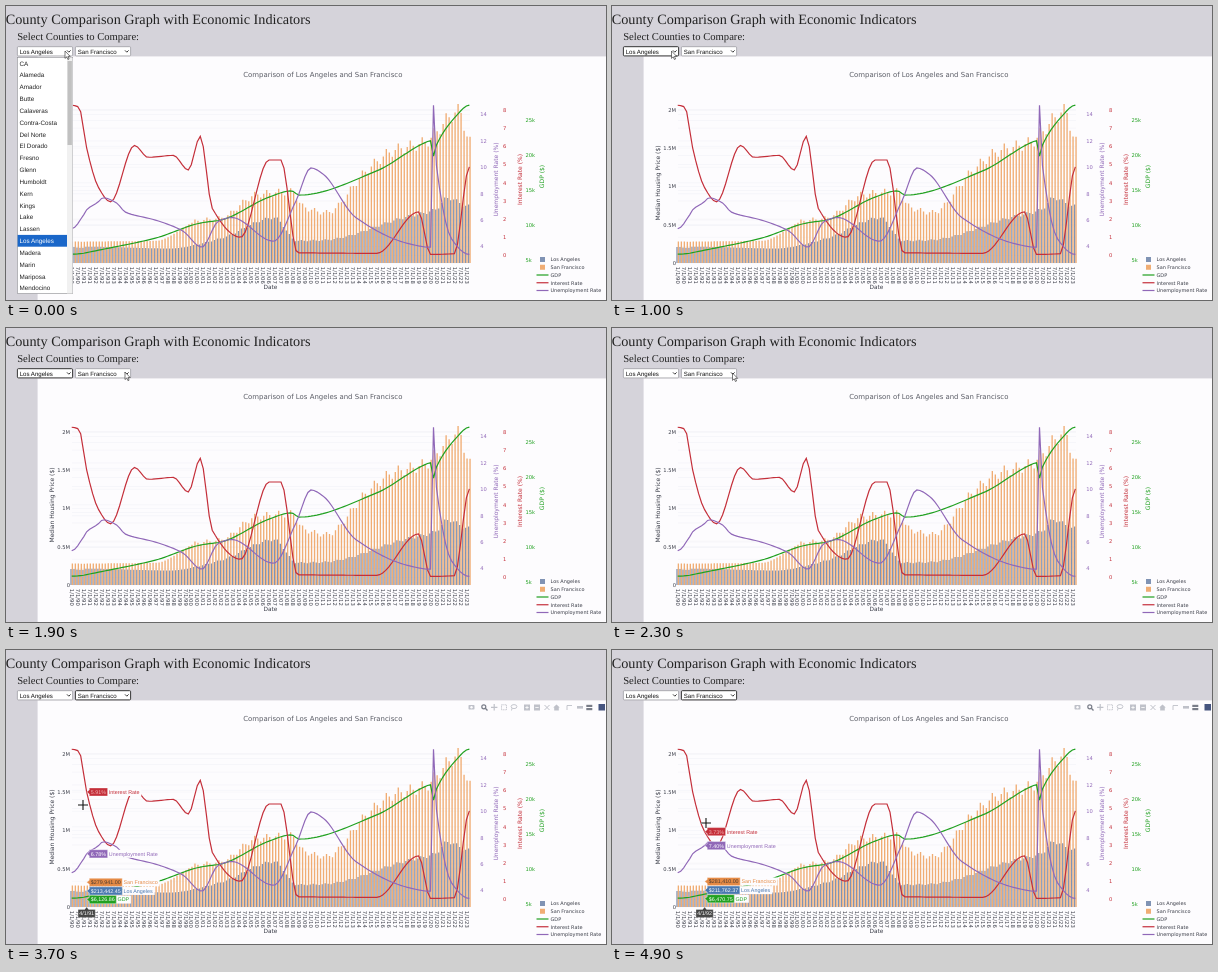
An HTML page for the animation above (5000 ms loop, 600 by 294 pixels).

```html
<!DOCTYPE html>
<html lang="en">
<head>
<meta charset="utf-8">
<title>County Comparison Graph</title>
<style>
html, body { margin: 0; width: 100%; height: 100%; overflow: hidden; background: #d5d3da; }
svg { display: block; width: 600px; height: 294px; text-rendering: geometricPrecision; }
.serif { font-family: "Liberation Serif", serif; }
.sans { font-family: "Liberation Sans", sans-serif; }
.plot { font-family: "DejaVu Sans", sans-serif; }
</style>
</head>
<body>
<svg id="stage" viewBox="0 0 600 294"><g id="page"></g><g id="live"></g></svg>
<script>
const RED = '#c42f3a', PURPLE = '#9068b8', GREEN = '#21a121', BLUE = '#8093b4', ORANGE = '#f0ad74', INK = '#3a3d48';
const BASE = 257, STEP = 2.99, QUARTERS = Array.from({ length: 134 }, (_, q) => q);
const quarterX = q => 65.7 + q * STEP;

// Smooth curve through key points that never overshoots them
function curve(...keys) {
  const slope = i => keys[i] && keys[i + 1] ? (keys[i + 1][1] - keys[i][1]) / (keys[i + 1][0] - keys[i][0]) : 0;
  const tangent = i => {
    const a = slope(i - 1), b = slope(i);
    return a * b > 0 ? 2 * a * b / (a + b) : 0;
  };
  return x => {
    const i = keys.findLastIndex(k => k[0] <= x);
    if (i < 0) return keys[0][1];
    if (i === keys.length - 1) return keys[i][1];
    const [[x0, y0], [x1, y1]] = keys.slice(i), w = x1 - x0, u = (x - x0) / w, v = 1 - u;
    return v * v * (1 + 2 * u) * y0 + u * u * (1 + 2 * v) * y1 + u * v * w * (v * tangent(i) - u * tangent(i + 1));
  };
}

const seasonal = (trend, size) => q => trend(q) * (1 + (q > 40 ? size * Math.cos((q - 1) * Math.PI / 2) : 0));
const percent = v => v.toFixed(2) + '%';
const money = v => '$' + v.toLocaleString('en-US', { minimumFractionDigits: 2, maximumFractionDigits: 2 });
const priceY = v => BASE - v * 76.6;

// Values by quarter since 1990: percent, thousands or millions of dollars
const interest = {
  name: 'Interest Rate', color: RED, y: v => 249.5 - 18.19 * v, show: percent,
  value: curve([0, 8.26], [2.5, 8.15], [4, 6.91], [5, 5.91], [9, 3.73], [13, 2.95], [21, 6.05], [25.5, 5.4], [34, 5.5],
    [39, 4.7], [43, 6.55], [47, 2.6], [56.5, 1], [66, 5.25], [70, 5.25], [75.5, .15], [102, .12], [116, 2.4],
    [120, .06], [128, .1], [133, 4.87])
};
const jobless = {
  name: 'Unemployment Rate', color: PURPLE, y: v => 240.5 - 13.2 * (v - 4), show: percent,
  value: curve([0, 5.35], [4, 6.4], [5, 6.78], [9, 7.4], [10.5, 7.7], [15, 7.3], [18, 6.6], [28, 6], [37, 5.2], [43.5, 3.95],
    [49, 5.9], [53.5, 6.2], [67.5, 4.4], [75, 7.45], [80, 9.95], [84, 9.5], [95, 6.2], [113, 4.2], [120, 3.95],
    [121, 14.7], [122, 10.1], [127, 4.6], [133, 3.4])
};
const gdp = {
  name: 'GDP', color: GREEN, y: v => 254.5 - 7 * (v - 5), show: v => money(v * 1e3),
  value: curve([0, 5.9], [4, 6.03518], [5, 6.12686], [9, 6.47075], [28, 8.2], [43, 10.35], [50, 10.8], [66, 14.05],
    [73.5, 14.95], [76, 14.35], [102, 17.8], [118, 21.8], [120, 22.1], [121, 19.9], [122, 21.5], [128.5, 25.6], [133, 27.2])
};
const priceA = {
  name: 'Los Angeles', color: '#4a78b0', y: priceY, show: v => money(v * 1e6),
  value: seasonal(curve([0, .21], [4, .19770641], [5, .21344245], [9, .21176237], [33, .19], [50, .32], [68, .59],
    [75.5, .29], [85, .3], [111, .59], [122, .7], [126, .85], [133, .74]), .03)
};
const priceB = {
  name: 'San Francisco', color: '#e58a45', y: priceY, show: v => money(v * 1e6),
  value: seasonal(curve([0, .28], [4, .278161], [5, .279941], [9, .28141], [28, .29], [42, .55], [50, .59], [61.5, .89],
    [73.5, .93], [77, .74], [85, .66], [98, 1.19], [107, 1.46], [118, 1.58], [129.5, 1.98], [133, 1.57]), .05)
};

const rect = (x, y, w, h, fill, extra = '') => `<rect x="${x}" y="${y}" width="${w}" height="${h}" fill="${fill}" ${extra}/>`;
const path = (d, stroke, w = 1, fill = 'none') => `<path d="${d}" stroke="${stroke}" stroke-width="${w}" fill="${fill}"/>`;
const text = (s, x, y, size, fill, cls = 'plot', extra = '') =>
  `<text x="${x}" y="${y}" font-size="${size}" fill="${fill}" class="${cls}" ${extra}>${s}</text>`;
const middle = 'text-anchor="middle"';
const vertical = (s, x, y, fill) => text(s, 0, 2, 6, fill, 'plot', `${middle} transform="translate(${x} ${y}) rotate(-90)"`);
const dateOf = q => `${q % 4 * 3 + 1}/1/${String((90 + (q >> 2)) % 100).padStart(2, '0')}`;

const bars = ({ value, y }, color, shift) =>
  path(QUARTERS.map(q => `M${quarterX(q) + shift} ${BASE}V${y(value(q))}`).join(''), color, 1.35);
const line = ({ value, y, color }) =>
  path('M' + QUARTERS.map(q => `${quarterX(q)} ${y(value(q))}`).join('L'), color, 1.2);

function axis(n, y0, step, x, fill, label, anchor = 'start') {
  let s = '';
  for (let i = 0; i < n; i++) {
    const y = y0 - i * step;
    s += path(`M66 ${y}H464`, '#efeef5', .5) + text(label(i), x, y + 1.8, 5.2, fill, 'plot', `text-anchor="${anchor}"`);
  }
  return s;
}

function legend() {
  const rows = [['Los Angeles', BLUE], ['San Francisco', ORANGE], ['GDP', GREEN], ['Interest Rate', RED], ['Unemployment Rate', PURPLE]];
  return rows.map(([name, c], i) => {
    const y = 253.5 + i * 7.75;
    return (i < 2 ? rect(534, y - 2.5, 5, 5, c) : path(`M530.5 ${y}H542.5`, c, 1.2)) + text(name, 544.5, y + 1.8, 4.95, INK);
  }).join('');
}

function chart() {
  const dates = QUARTERS.filter(q => q % 2 === 0).map(q =>
    text(dateOf(q), 0, 1.8, 5.3, INK, 'plot', `transform="translate(${quarterX(q)} 260.8) rotate(90)"`)).join('');
  return rect(31.6, 50.4, 569, 244, '#fdfcfe')
    + text('Comparison of Los Angeles and San Francisco', 316.8, 71, 6.95, '#5b5d66', 'plot', middle)
    + axis(5, BASE, 38.3, 64, INK, i => i ? i / 2 + 'M' : '0', 'end')
    + axis(6, 240.5, 26.4, 474.3, PURPLE, i => 4 + 2 * i)
    + axis(9, 249.5, 18.19, 497, RED, i => i)
    + axis(5, 254.5, 35, 519.5, GREEN, i => 5 + 5 * i + 'k')
    + vertical('Median Housing Price ($)', 46.4, 177, INK) + vertical('Unemployment Rate (%)', 490, 173.5, PURPLE)
    + vertical('Interest Rate (%)', 513.5, 173.5, RED) + vertical('GDP ($)', 536, 170.5, GREEN)
    + dates + text('Date', 264.5, 283, 5.8, INK, 'plot', middle)
    + bars(priceA, BLUE, -.67) + bars(priceB, ORANGE, .67)
    + line(gdp) + line(interest) + line(jobless) + legend();
}

function select(x, label, focused) {
  return rect(x + .4, 40.7, 55.2, 9.2, '#fff', `rx="1" stroke="${focused ? '#222' : '#85858c'}" stroke-width="${focused ? .9 : .6}"`)
    + text(label, x + 2.7, 47.6, 6.1, '#111', 'sans') + path(`M${x + 50} 44.4l1.8 1.8l1.8 -1.8`, '#222', .9);
}

const firstList = ['CA', 'Alameda', 'Amador', 'Butte', 'Calaveras', 'Contra-Costa', 'Del Norte', 'El Dorado', 'Fresno', 'Glenn',
  'Humboldt', 'Kern', 'Kings', 'Lake', 'Lassen', 'Los Angeles', 'Madera', 'Marin', 'Mariposa', 'Mendocino'];
const secondList = [...firstList.slice(14), 'Merced', 'Mono', 'Monterey', 'Napa', 'Nevada', 'Orange', 'Placer', 'Plumas',
  'Riverside', 'Sacramento', 'San Benito', 'San Bernardino', 'San Diego', 'San Francisco'];

function popup(x, items, chosen, thumbY) {
  let s = rect(x + .3, 51.3, 55.4, 236.4, '#fff', 'stroke="#8a8a90" stroke-width=".6"');
  items.forEach((name, i) => {
    const y = 57.2 + i * 11.84, on = name === chosen;
    if (on) s += rect(x + .6, y - 5.9, 49.4, 11.8, '#1a67c9');
    s += text(name, x + 2.5, y + 2.3, 6.3, on ? '#fff' : '#222', 'sans');
  });
  return s + rect(x + 50, 51.6, 5.4, 235.8, '#f1f1f1') + rect(x + 50.5, thumbY, 4.4, 84, '#c1c1c1');
}

function modebar() {
  const c = '#bfc1c9', dark = '#797d88';
  return rect(462.5, 55, 6, 4.6, c, 'rx=".8"') + '<circle cx="465.5" cy="57.3" r="1.2" fill="#fdfcfe"/>'
    + `<circle cx="477.8" cy="56.8" r="2" fill="none" stroke="${dark}" stroke-width="1.2"/>` + path('M479.3 58.3l2.2 2.2', dark, 1.3)
    + path('M485 57.3h6.4M488.2 54.1v6.4', c, 1.2)
    + rect(495.5, 54.8, 5, 5, 'none', `stroke="${c}" stroke-width=".9" stroke-dasharray="1.2 .6"`)
    + `<ellipse cx="508" cy="56.6" rx="2.9" ry="2" fill="none" stroke="${c}" stroke-width=".9"/>` + path('M506 58.3l-.5 2.2', c, .9)
    + rect(518, 54.5, 6, 6, c) + path('M519.3 57.5h3.4M521 55.8v3.4', '#fff', .8)
    + rect(528, 54.5, 6, 6, c) + path('M529.3 57.5h3.4', '#fff', .8)
    + path('M538.5 55l5 5M543.5 55l-5 5', c, 1)
    + path('M547.2 57.5l3.3 -3l3.3 3h-1v3h-4.6v-3z', 'none', 0, c)
    + path('M561 60v-4.5h5', c, .9) + rect(571, 56, 6, 2.6, c)
    + rect(580.3, 54.8, 6, 2.2, dark) + rect(580.3, 58, 6, 2.2, dark) + rect(592.5, 54, 6.5, 6.5, '#46557f');
}

const ruler = document.createElement('canvas').getContext('2d');
ruler.font = '100px "Liberation Sans", sans-serif';
const widthOf = s => ruler.measureText(s).width * .0536;

function tag(x, y, { name, color, show }, v, ink = '#fff') {
  const label = show(v), w = widthOf(label) + 3.2, left = x + 2.6;
  return rect(left + w, y - 4, widthOf(name) + 3, 8, '#fdfcfe')
    + path(`M${x} ${y}l2.6 -2v-2.1h${w}v8.2h${-w}v-2.1z`, '#fff', .4, color)
    + text(label, left + 1.6, y + 1.9, 5.36, ink, 'sans') + text(name, left + w + 1.2, y + 1.9, 5.36, color, 'sans');
}

function hover(q) {
  const x = quarterX(q), gap = 8.6;
  const [r, u, b, a, g] = [interest, jobless, priceB, priceA, gdp].map(s => ({ v: s.value(q), y: s.y(s.value(q)) }));
  const mean = (a.y + b.y + g.y) / 3, push = Math.max(0, gap - Math.abs(r.y - u.y)) / 2 * (r.y < u.y ? -1 : 1);
  return tag(x, r.y + push, interest, r.v, '#f0b4b6') + tag(x, u.y - push, jobless, u.v)
    + tag(x, mean - gap, priceB, b.v, '#4b3a30') + tag(x, mean, priceA, a.v) + tag(x, mean + gap, gdp, g.v)
    + path(`M${x} 257l2 2.4h6.6v8h-17.2v-8h6.6z`, '#fff', .3, '#444')
    + text(dateOf(q), x, 265.3, 5.36, '#fff', 'sans', middle);
}

// Pointer position by time
const routeX = curve([0, 59], [1000, 59.5], [1400, 86.5], [1900, 119], [2300, 120.5], [2800, 120], [3600, 80], [3700, 77], [4300, 78], [4800, 94]);
const routeY = curve([0, 45], [1000, 45], [1400, 43.5], [2300, 45], [2800, 46], [3700, 155], [4300, 180], [4800, 173]);

function pointer(x, y) {
  if (y > 91) {
    const d = `M${x - 5} ${y}h10M${x} ${y - 5}v10`;
    return path(d, '#fff', 1.8) + path(d, '#111', 1.1);
  }
  return path(`M${x} ${y}v7.4l1.7 -1.6l1.2 2.7l1.2 -.5l-1.2 -2.6h2.3z`, '#222', .6, '#fff');
}

const page = document.getElementById('page'), live = document.getElementById('live');
page.innerHTML = rect(0, 0, 600, 294, '#d5d3da')
  + text('County Comparison Graph with Economic Indicators', -.3, 18.3, 14.24, '#222', 'serif')
  + text('Select Counties to Compare:', 11.2, 34.3, 10.64, '#222', 'serif') + chart();

function draw(now) {
  const t = now % 5000, x = routeX(t), y = routeY(t);
  let s = select(11, 'Los Angeles', t >= 300 && t < 2200) + select(69, 'San Francisco', t >= 2800);
  if (y > 51) s += modebar();
  // The labels trail the pointer slightly
  if (y > 91) s += hover(Math.round((routeX(t - 100) - quarterX(0)) / STEP));
  if (t < 300) s += popup(11, firstList, 'Los Angeles', 55);
  if (t >= 2400 && t < 2800) s += popup(69, secondList, 'San Francisco', 115);
  live.innerHTML = s + pointer(x, y);
  requestAnimationFrame(draw);
}
requestAnimationFrame(draw);
</script>
</body>
</html>
```
